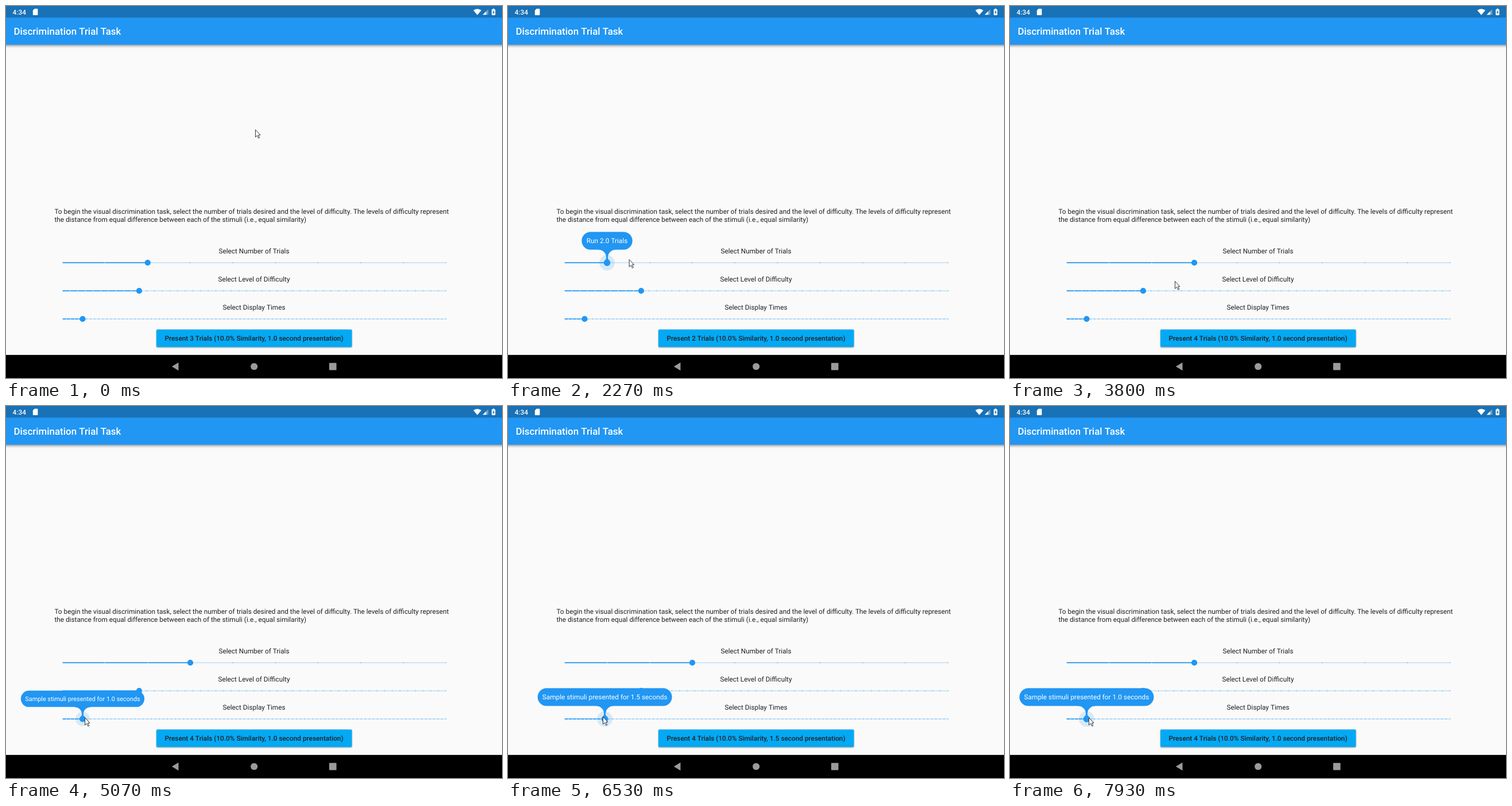
These frames come from a looping animation (864x648 px, 8 s). An HTML page:

```html
<!DOCTYPE html>
<html lang="en">
<head>
<meta charset="utf-8">
<title>Discrimination Trial Task</title>
<style>
  html, body { margin: 0; width: 100%; height: 100%; overflow: hidden; background: #fafafa; }
  svg { display: block; width: 864px; height: 648px; }
  text { font: 400 11.8125px Roboto, sans-serif; fill: #212121; text-rendering: geometricPrecision; white-space: pre; }
  .gap { font-kerning: none; }
  .mid { text-anchor: middle; }
  .medium { font-weight: 500; }
  .title { font-size: 16.875px; font-weight: 500; }
  .white { fill: #fff; }
  .blue { fill: #2196f3; }
  .bar { filter: drop-shadow(0 2px 2px rgba(0, 0, 0, .4)); }
  .button { fill: #03a9f4; filter: drop-shadow(0 1.4px 1.2px rgba(0, 0, 0, .4)); }
</style>
</head>
<body>
<svg viewBox="0 0 864 648">
  <rect width="864" height="648" fill="#fafafa"/>
  <rect class="blue bar" x="-10" y="-10" width="884" height="77.5"/>
  <rect width="864" height="20.25" fill="#1971b6"/>
  <text class="medium white" x="11.6" y="14.8">4:34</text>
  <g fill="#fff">
    <path d="M49.700 4.800H54.600a.8.800 0 0 1 .8.800v9.500a.8.800 0 0 1-.8.800h-7a.8.800 0 0 1-.8-.8V7.800z"/>
    <path d="M814 7.600Q821 2.300 828 7.600L821 15.800z"/>
    <path d="M840.200 5.500V15.300H830.400z" opacity=".35"/>
    <path d="M836.500 9.200V15.300H830.400z"/>
    <path d="M848 4.500h2.400v1.200h1.200a.8.800 0 0 1 .8.800v8.600a.8.800 0 0 1-.8.800h-4.800a.8.800 0 0 1-.8-.8V6.500a.8.800 0 0 1 .8-.8H848z"/>
  </g>
  <path d="M849.700 7.300L847.300 11.500H848.800V14.500L851.200 10.200H849.700z" fill="#1971b6"/>
  <text class="title white" x="13.500" y="50.200">Discrimination Trial Task</text>
  <text x="84.400" y="362">To begin the visual discrimination task, select the number of trials desired and the level of difficulty. The levels of difficulty represent</text>
  <text x="84.400" y="375.600">the distance from equal difference between each of the stimuli (i.e., equal similarity)</text>
  <g id="rows"></g>
  <rect class="button" x="262" y="563.500" width="340.500" height="30.400" rx="1.700"/>
  <text id="label" class="mid medium" x="432" y="583.200"></text>
  <rect y="607.800" width="864" height="41"/>
  <g fill="#9b9b9b">
    <path d="M288.800 628L300.500 621V635z"/>
    <circle cx="432.200" cy="628" r="6.100"/>
    <rect x="563" y="621.700" width="12.600" height="12.600" rx=".8"/>
  </g>
  <g id="bubbles"></g>
  <path id="cursor" d="M.5.500V13.300L3.600 10.500L5.800 15.300L7.700 14.500L5.600 9.700H9z" fill="#fff" stroke="#222" stroke-width=".9" stroke-linejoin="round"/>
</svg>
<script>
const FPS = 15, FRAMES = 120;
const LEFT = 98.3, WIDTH = 668.2, BLUE = "#2196f3";
const NECK = "M-15-23.500V-22.600A13.600 13.600 0 0 1-1.450-9V-8.400A4.370 4.370 0 0 1-3.300-4.800" +
  "A5.800 5.800 0 1 0 3.300-4.800A4.370 4.370 0 0 1 1.450-8.400V-9A13.600 13.600 0 0 1 15-22.600V-23.500z";
const $ = id => document.getElementById(id);

// Pointer stops: step, x, y
const stops = [
  [4, 434, 215], [17, 247, 441], [28, 208, 441], [33, 208, 441], [44, 322, 442], [51, 322, 442],
  [57, 287, 479], [64, 259, 533], [69, 131, 541], [72, 137, 542.5], [77, 137, 542.5],
  [87, 195, 542], [98, 165, 541], [112, 143, 542], [116, 143, 542], [118, 137, 542.5]
];

const slope = (i, c) => (stops[i + 1][c] - stops[i][c]) / (stops[i + 1][0] - stops[i][0]);

// Speed through a stop: zero at holds and turns, else the harmonic mean.
function speed(i, c) {
  if (i === 0 || i === stops.length - 1) return 0;
  const a = slope(i - 1, c), b = slope(i, c);
  return a * b > 0 ? 2 * a * b / (a + b) : 0;
}

function pointer(n, c) {
  const end = stops.length - 1;
  if (n <= stops[0][0]) return stops[0][c];
  if (n >= stops[end][0]) return stops[end][c];
  const i = stops.findIndex(s => s[0] >= n) - 1;
  const a = stops[i], b = stops[i + 1], span = b[0] - a[0], u = (n - a[0]) / span;
  const s = u * u * (3 - 2 * u);
  return a[c] + (b[c] - a[c]) * s + span * u * (1 - u) * (speed(i, c) * (1 - u) - speed(i + 1, c) * u);
}

function add(parent, name, attrs) {
  const el = document.createElementNS("http://www.w3.org/2000/svg", name);
  for (const k in attrs) el.setAttribute(k, attrs[k]);
  return parent.appendChild(el);
}

// Spaces get their own run so words do not kern across them.
function write(el, str) {
  if (el.dataset.str === str) return;
  el.dataset.str = str;
  el.textContent = "";
  for (const part of str.split(/( )/))
    if (part === " ") add(el, "tspan", { class: "gap" }).textContent = part;
    else el.append(part);
}

// The value follows the pointer one step late while held.
function slider({ title, y, parts, value, from, to, half, hint }) {
  const g = $("rows");
  const place = i => LEFT + WIDTH * i / parts;
  write(add(g, "text", { x: 432, y: y - 16.2, class: "mid" }), title);
  const bar = { x: LEFT, y: y - .85, width: WIDTH, height: 1.7, fill: BLUE };
  add(g, "rect", { ...bar, "fill-opacity": .24 });
  const fill = add(g, "rect", bar);
  const ticks = [];
  for (let i = 0; i <= parts; i++)
    ticks.push(add(g, "circle", { cx: place(i), cy: y, r: .84, "fill-opacity": .54 }));
  const halo = add(g, "circle", { cy: y, fill: BLUE, "fill-opacity": .16 });
  const thumb = add(g, "circle", { cy: y, r: 5.1, fill: BLUE });
  const bubble = add($("bubbles"), "g", {});
  add(bubble, "rect", { class: "blue", x: -half, y: -53.7, width: half * 2, height: 31, rx: 15.5 });
  add(bubble, "path", { class: "blue", d: NECK });
  const tip = add(bubble, "text", { class: "mid white", y: -34 });

  const scale = n => n < from || n > to + 1 ? 0 : n === from ? .92 : n > to ? .4 : 1;
  return n => {
    let i = value;
    if (from) {
      const x = pointer(Math.min(Math.max(n, from) - 1, to), 1) - 1;
      i = Math.round((x - LEFT) / WIDTH * parts);
    }
    const x = place(i), k = from ? scale(n) : 0;
    fill.setAttribute("width", x - LEFT);
    thumb.setAttribute("cx", x);
    halo.setAttribute("cx", x);
    halo.setAttribute("r", 13.5 * k);
    ticks.forEach((t, j) => t.setAttribute("fill", j < i ? "#fff" : BLUE));
    bubble.setAttribute("visibility", k ? "visible" : "hidden");
    bubble.setAttribute("transform", `translate(${x} ${y}) scale(${k})`);
    if (hint) write(tip, hint(i));
    return i;
  };
}

const seconds = i => (.5 + i / 10).toFixed(1);
const trials = slider({
  title: "Select Number of Trials", y: 447.2, parts: 9, from: 18, to: 51, half: 44.2,
  hint: i => `Run ${i + 1}.0 Trials`
});
const level = slider({ title: "Select Level of Difficulty", y: 496.2, parts: 50, value: 10 });
const times = slider({
  title: "Select Display Times", y: 545.2, parts: 95, from: 76, to: FRAMES, half: 117,
  hint: i => `Sample stimuli presented for ${seconds(i)} seconds`
});

function draw(n) {
  level(n);
  write($("label"), `Present ${trials(n) + 1} Trials (10.0% Similarity, ${seconds(times(n))} second presentation)`);
  $("cursor").setAttribute("transform", `translate(${pointer(n, 1)} ${pointer(n, 2)})`);
}

document.querySelectorAll("text").forEach(el => write(el, el.textContent));

let start, last = -1;
function tick(now) {
  start ??= now;
  const n = Math.floor((now - start + 5) * FPS / 1000) % FRAMES;
  if (n !== last) draw(last = n);
  requestAnimationFrame(tick);
}
draw(0);
requestAnimationFrame(tick);
</script>
</body>
</html>
```
